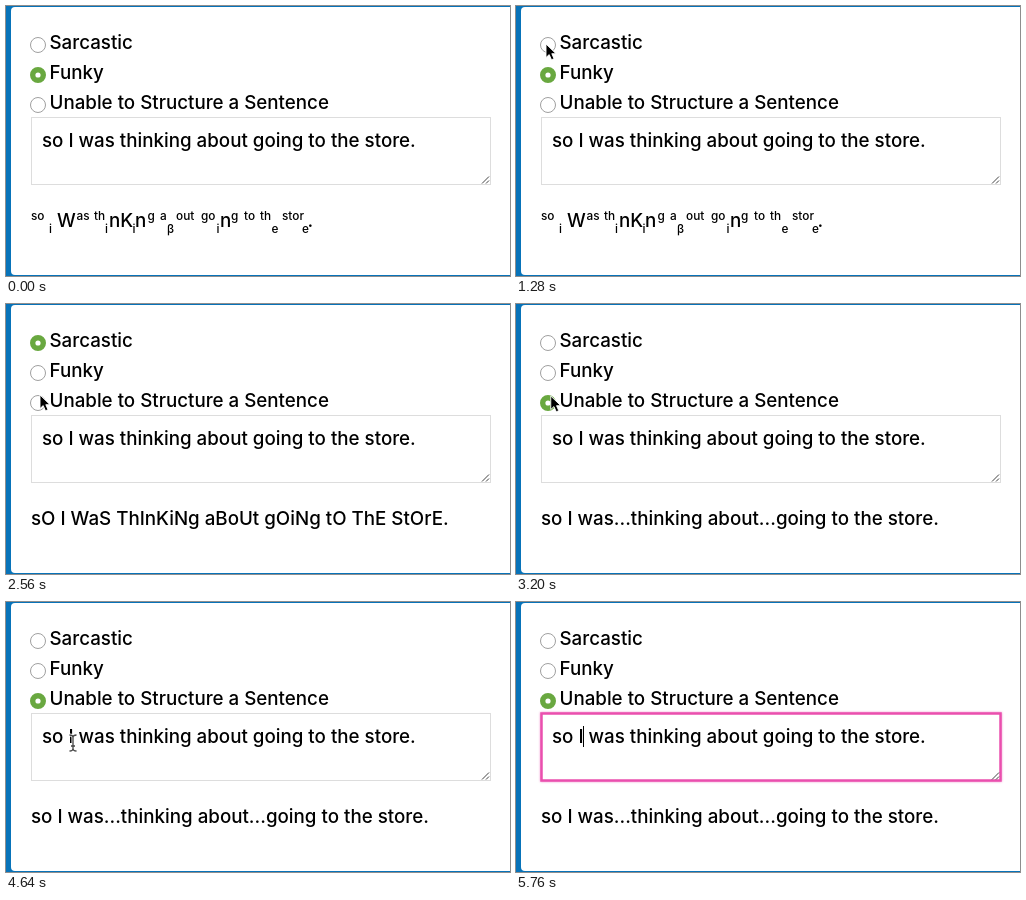
An HTML page that plays this animation: 504x270 px, repeating every 6080 ms.

```html
<!DOCTYPE html>
<html lang="en">
<head>
<meta charset="utf-8">
<title>Sentence styles</title>
<style>
html, body { margin: 0; height: 100%; overflow: hidden; }
svg { display: block; width: 504px; height: 270px; background: #0873b9; }
text { font: 500 18.75px Inter, sans-serif; fill: #000; white-space: pre; }
#funky text { font-size: 11.8px; }
#funky .full { font-size: 18.75px; }
.radio { fill: #fff; stroke: #a0a0a0; }
.radio.on { stroke: #69a840; stroke-width: 5.4; }
#box { fill: #fff; stroke: #ddd; }
#box.focus { stroke: #ea4fae; stroke-width: 2.5; filter: drop-shadow(0 0 1.2px #f08cca); }
</style>
</head>
<body>
<svg viewBox="0 0 504 270">
  <rect x="5" y="1" width="520" height="268" rx="4" fill="#fff"/>
  <g id="options"></g>
  <rect id="box" x="25.5" y="111.5" width="459" height="67"/>
  <path d="M476 177.500l7-7M480 177.500l3-3" stroke="#444" fill="none"/>
  <text x="36" y="141">so I was thinking about going to the store.</text>
  <path id="caret" d="M67.500 124v21" stroke="#000"/>
  <g id="funky"></g>
  <text id="output" x="25" y="221"></text>
  <path id="arrow" d="M0 0V13.500L3.200 10.600L5.500 15.800L8 14.700L5.800 9.700H10Z" stroke="#fff" stroke-width=".9"/>
  <g id="beam" fill="none">
    <path d="M-3.500-8Q0-8 0-5.500V5.500Q0 8-3.500 8M3.500-8Q0-8 0-5.500M0 5.500Q0 8 3.500 8M-2 3H2" stroke="#fff" stroke-width="3"/>
    <path d="M-3.500-8Q0-8 0-5.500V5.500Q0 8-3.500 8M3.500-8Q0-8 0-5.500M0 5.500Q0 8 3.500 8M-2 3H2" stroke="#444" stroke-width="1.3"/>
  </g>
</svg>
<script>
const LOOP = 6080, STEP = 160;
const $ = id => document.getElementById(id);
const show = (el, on) => el.style.display = on ? '' : 'none';

function add(parent, tag, attrs, text = '') {
  const el = document.createElementNS('http://www.w3.org/2000/svg', tag);
  for (const name in attrs) el.setAttribute(name, attrs[name]);
  el.textContent = text;
  return parent.appendChild(el);
}

const radios = ['Sarcastic', 'Funky', 'Unable to Structure a Sentence'].map((label, i) => {
  add($('options'), 'text', { x: 43.5, y: 43 + 30 * i }, label);
  return add($('options'), 'circle', { cx: 32, cy: 39 + 30 * i });
});

// Raised, lowered and full-size runs: [text, x]
const rows = [
  [214, '', [['so', 25], ['as', 70.5], ['th', 88], ['g', 141.5], ['a', 154], ['out', 170],
    ['go', 195], ['g', 225], ['to', 238], ['th', 254], ['stor', 276]]],
  [227, '', [['i', 43], ['i', 99], ['i', 126.5], ['β', 161], ['i', 210.5], ['e', 265.5], ['e', 296]]],
  [221, 'full', [['W', 51], ['nK', 103], ['n', 129], ['n', 214], ['.', 301.5]]]
];
for (const [y, style, runs] of rows)
  for (const [text, x] of runs) add($('funky'), 'text', { x, y, class: style }, text);

// Pointer path: [ms, x, y]
const path = [
  [160, 236, 168], [480, 126, 131], [800, 48, 58], [1120, 22, 32], [1280, 30, 38],
  [1920, 30, 38], [2560, 34, 91], [2880, 44, 100], [3040, 35, 92], [3680, 34, 92],
  [4000, 42, 108], [4320, 60, 133], [4640, 67, 141], [5120, 67, 141],
  [5440, 72, 186], [5600, 76, 245], [5760, 80, 290]
];

function pointerAt(t) {
  const next = path.findIndex(p => p[0] > t);
  if (next < 1) return null;
  const [t0, x0, y0] = path[next - 1], [t1, x1, y1] = path[next];
  const k = (t - t0) / (t1 - t0);
  return [x0 + (x1 - x0) * k, y0 + (y1 - y0) * k];
}

function draw(now) {
  const t = Math.floor(now % LOOP / STEP) * STEP;
  const choice = t < 1760 ? 1 : t < 3200 ? 0 : 2;
  radios.forEach((radio, i) => {
    const on = i === choice;
    radio.setAttribute('class', on ? 'radio on' : 'radio');
    radio.setAttribute('r', on ? 5.3 : 7.5);
  });
  show($('funky'), choice === 1);
  $('output').textContent = [
    'sO I WaS ThInKiNg aBoUt gOiNg tO ThE StOrE.', '',
    'so I was...thinking about...going to the store.'
  ][choice];

  const focused = t >= 4800;
  $('box').setAttribute('class', focused ? 'focus' : '');
  show($('caret'), focused);

  const pointer = pointerAt(t);
  const typing = t >= 4000 && pointer && pointer[1] > 111 && pointer[1] < 179;
  show($('beam'), typing);
  show($('arrow'), pointer && !typing);
  if (pointer) $(typing ? 'beam' : 'arrow').setAttribute('transform', `translate(${pointer})`);
  requestAnimationFrame(draw);
}
requestAnimationFrame(draw);
</script>
</body>
</html>
```
